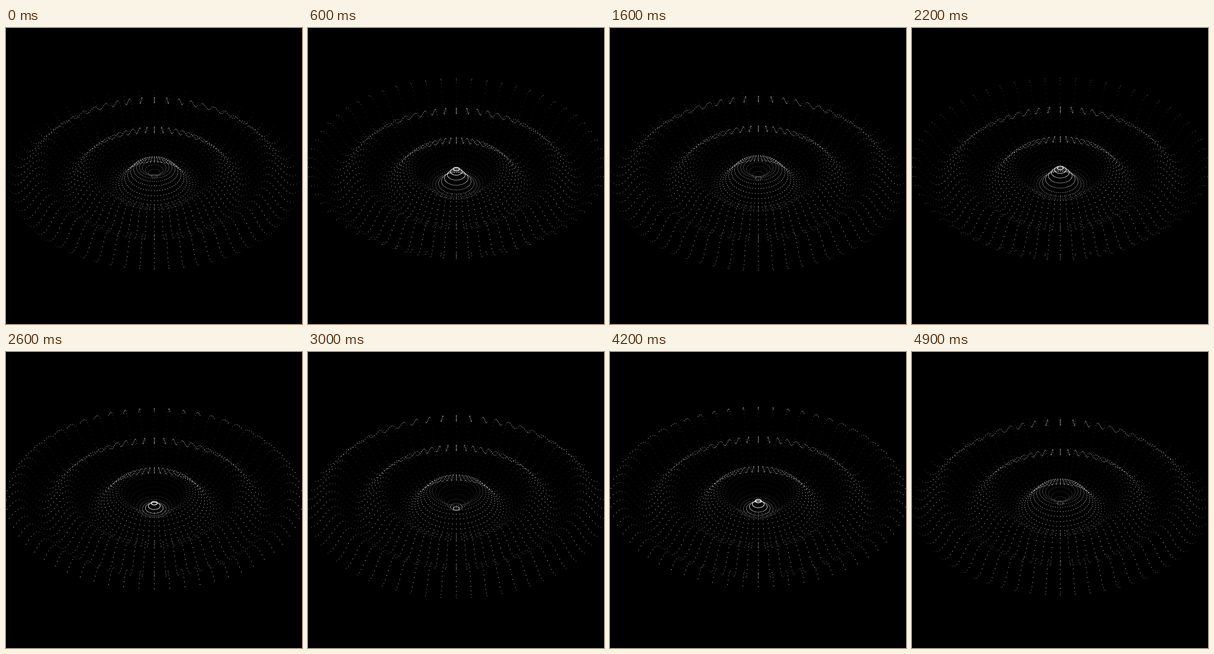
Write an HTML page with a canvas that moves like this. It is 500x500 px and loops after 5 s.

```html
<!DOCTYPE html>
<html lang="en">
<head>
<meta charset="utf-8">
<title>Ripple</title>
<style>
  html, body { margin: 0; width: 100%; height: 100%; overflow: hidden; background: #000; }
  canvas { display: block; }
</style>
</head>
<body>
<canvas id="stage" width="500" height="500"></canvas>
<script>
const ctx = document.getElementById('stage').getContext('2d');
const TAU = Math.PI * 2;
const LOOP = 5000, STEP = 100, CYCLES = 3;
const RINGS = 50, SPOKES = 60, GAP = 5;
const CX = 250, CY = 249.5, TILT = 0.6, HEIGHT = 15;
const WAVELENGTH = RINGS * GAP / 3;
const CREST_TIME = 520; // when the crest reaches the centre

function draw(time) {
  ctx.globalAlpha = 1;
  ctx.fillStyle = '#000';
  ctx.fillRect(0, 0, 500, 500);
  ctx.fillStyle = '#fff';
  const turn = (time - CREST_TIME) / LOOP * CYCLES;
  for (let i = 1; i <= RINGS; i++) {
    const r = i * GAP;
    const phase = TAU * (turn + r / WAVELENGTH);
    const lift = HEIGHT * Math.cos(phase);
    // outer slopes are lit, inner slopes lie in shade
    ctx.globalAlpha = 0.52 + 0.4 * Math.sin(phase);
    for (let j = 0; j < SPOKES; j++) {
      const a = TAU * j / SPOKES;
      ctx.fillRect(CX + r * Math.sin(a), CY + r * TILT * Math.cos(a) - lift, 1, 1);
    }
  }
}

let start;
function tick(now) {
  start ??= now;
  draw(Math.floor((now - start) % LOOP / STEP) * STEP);
  requestAnimationFrame(tick);
}
draw(0);
requestAnimationFrame(tick);
</script>
</body>
</html>
```
